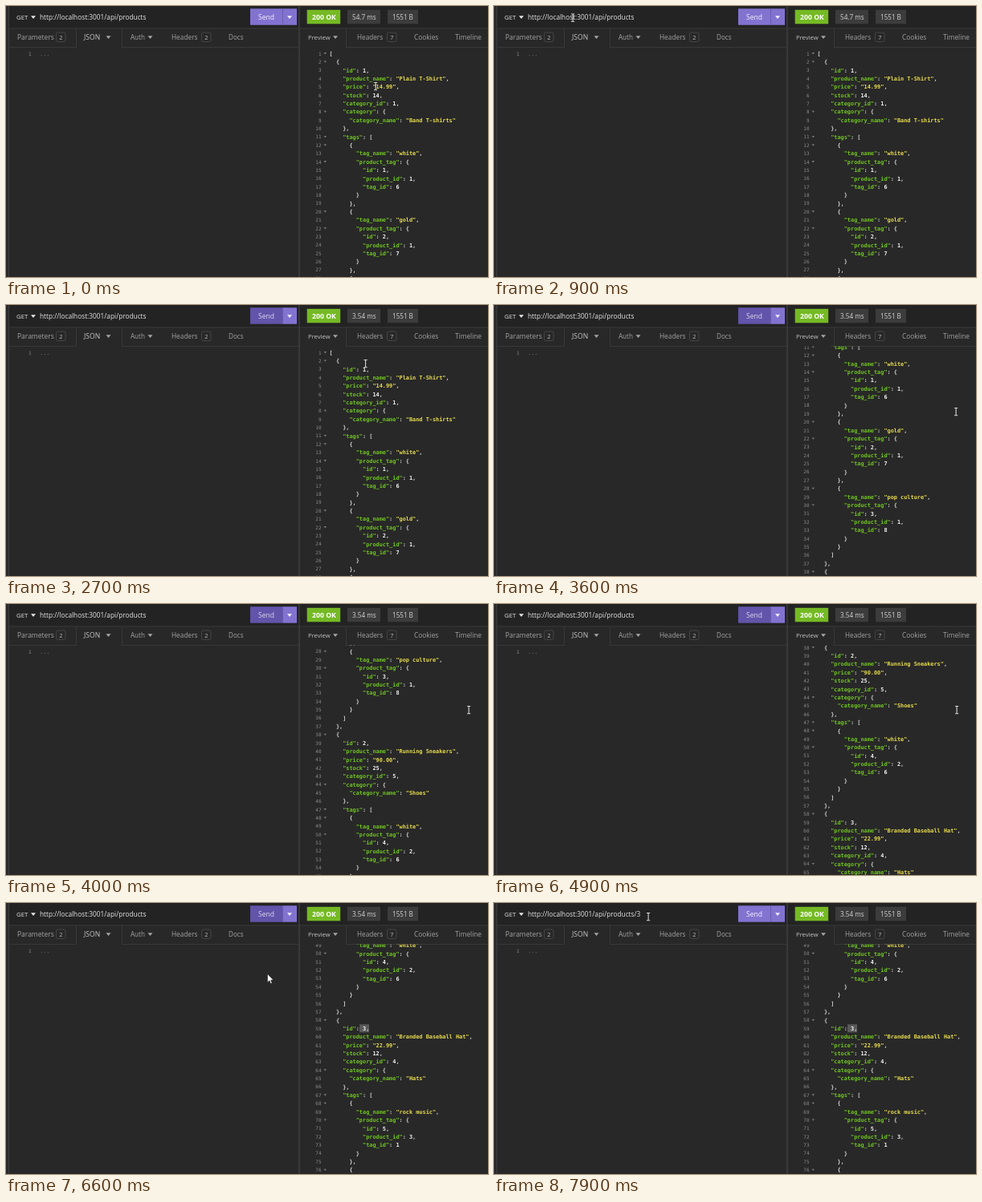
Write an HTML page with a canvas that moves like this. It is 600 by 338 pixels and loops after 8 s.

```html
<!DOCTYPE html>
<html lang="en">
<head>
<meta charset="utf-8">
<title>API client</title>
<style>
  html, body { margin: 0; width: 100%; height: 100%; overflow: hidden; background: #282828; }
  canvas { display: block; width: 600px; height: 338px; }
</style>
</head>
<body>
<canvas id="stage"></canvas>
<script>
const LOOP = 8000, STEP = 100, W = 600, H = 338;
const UI = '"Open Sans", "Noto Sans", sans-serif';
const MONO = '"DejaVu Sans Mono", monospace';
const LINE = 10.38, NOTCH = 56.1, CODE_X = 402.6, CODE_SIZE = 6.88, FIRST_Y = 59.2;
const BORDER = '#3c3c3c', MUTED = '#a3a3a3', LIGHT = '#e4e4e4';

const canvas = document.getElementById('stage');
const ctx = canvas.getContext('2d');
const ratio = window.devicePixelRatio || 1;
canvas.width = W * ratio;
canvas.height = H * ratio;

// Response body
let linkId = 0;
function product(id, product_name, price, stock, category_id, category_name, tags) {
  return {
    id, product_name, price, stock, category_id,
    category: { category_name },
    tags: tags.map(([tag_name, tag_id]) => ({
      tag_name,
      product_tag: { id: ++linkId, product_id: id, tag_id }
    }))
  };
}
const lines = JSON.stringify([
  product(1, 'Plain T-Shirt', '14.99', 14, 1, 'Band T-shirts', [['white', 6], ['gold', 7], ['pop culture', 8]]),
  product(2, 'Running Sneakers', '90.00', 25, 5, 'Shoes', [['white', 6]]),
  product(3, 'Branded Baseball Hat', '22.99', 12, 4, 'Hats', [['rock music', 1], ['pop music', 2]])
], null, 2).split('\n');

// Timeline
const pointerPath = [
  [0, 460, 100], [200, 452, 96], [700, 178, 16], [1000, 70, 14], [1200, 84, 14],
  [1500, 160, 14], [1700, 162, 14], [2000, 298, 27], [2200, 324, 16], [2500, 325, 16],
  [2900, 570, 130], [3200, 575, 133], [3600, 575, 133], [3900, 576, 132], [5200, 576, 132],
  [5500, 474, 170], [5800, 453, 157], [6000, 452, 156], [6200, 440, 156], [6400, 441, 157],
  [6800, 210, 20], [7000, 192, 17]
];
const notches = [3300, 3483, 3640, 3740, 3840, 4620, 4790, 5080, 5230];
const SELECT_URL = 1600, CLICK_SEND = 2400, BLUR = 2600;
const SELECT_ID = [6000, 6200], FOCUS_URL = 7000, TYPE = [7500, 7700];

const clamp = v => Math.max(0, Math.min(1, v));
const ease = v => v * v * (3 - 2 * v);

function pointerAt(t) {
  const next = pointerPath.findIndex(p => p[0] > t);
  if (next < 0) return pointerPath[pointerPath.length - 1].slice(1);
  const [t0, x0, y0] = pointerPath[next - 1], [t1, x1, y1] = pointerPath[next];
  const k = ease((t - t0) / (t1 - t0));
  return [x0 + (x1 - x0) * k, y0 + (y1 - y0) * k];
}

const scrollAt = t => NOTCH * notches.reduce((sum, at) => sum + ease(clamp((t - at) / 130)), 0);

// Drawing helpers
function text(str, x, y, size, color, weight = 400, family = UI) {
  ctx.font = `${weight} ${size}px ${family}`;
  ctx.fillStyle = color;
  ctx.fillText(str, x, y);
  return ctx.measureText(str).width;
}

function rect(x, y, w, h, color) {
  ctx.fillStyle = color;
  ctx.fillRect(x, y, w, h);
}

function polygon(points, color) {
  ctx.beginPath();
  points.forEach(([x, y]) => ctx.lineTo(x, y));
  ctx.closePath();
  ctx.fillStyle = color;
  ctx.fill();
}

function caret(x, y, color = MUTED, r = 3) {
  polygon([[x - r, y - r * 0.6], [x + r, y - r * 0.6], [x, y + r * 0.7]], color);
}

function badge(x, label) {
  ctx.strokeStyle = '#4c4c4c';
  ctx.lineWidth = 0.8;
  ctx.beginPath();
  ctx.roundRect(x + 0.5, 33, 11.5, 11.5, 2);
  ctx.stroke();
  text(label, x + 4.2, 41.6, 7.3, '#bcbcbc');
}

function drawRequest(t) {
  text('GET', 13, 17, 7.8, LIGHT);
  caret(34, 14, LIGHT);

  let url = 'http://localhost:3001/api/products';
  if (t >= SELECT_URL && t < CLICK_SEND) rect(140, 8.5, 35.5, 11.5, '#5a5a5a');
  TYPE.forEach((at, i) => { if (t >= at) url += '/3'[i]; });
  text(url, 42, 17, 8.3, LIGHT);

  const bright = t < BLUR || t >= FOCUS_URL;
  rect(304, 3.3, 40.5, 20.4, bright ? '#8373d0' : '#6254aa');
  rect(344.5, 3.3, 17.5, 20.4, '#8373d0');
  rect(344, 3.3, 0.8, 20.4, '#6b5cb6');
  text('Send', 314, 17.2, 8.6, bright ? '#f4f2ff' : '#dcd8f0');
  caret(353, 14, '#f0eeff');

  text('Parameters', 14, 42.2, 8.5, MUTED);
  badge(62, '2');
  text('JSON', 97, 42.2, 8.6, '#c4c4c4');
  caret(127.5, 39);
  text('Auth', 155, 42.2, 8.1, MUTED);
  caret(179.5, 39);
  text('Headers', 206, 42.2, 8.3, MUTED);
  badge(243, '2');
  text('Docs', 277, 42.2, 8.1, MUTED);

  text('1', 28, 61.5, 6, '#8a8a8a', 400, MONO);
  text('...', 42, 61.5, CODE_SIZE, '#767676', 400, MONO);
}

function drawResponseHeader(t) {
  rect(374.7, 4.8, 41.5, 17.5, '#75ba24');
  text('200 OK', 381, 17, 8.7, '#ffffff', 700);
  rect(425, 4.8, 41, 17.5, '#3c3c3c');
  text(t < CLICK_SEND ? '54.7 ms' : '3.54 ms', 431, 16.9, 8.1, '#d4d4d4');
  rect(475, 4.8, 38, 17.5, '#3c3c3c');
  text('1551 B', 481, 16.9, 8.1, '#d4d4d4');

  text('Preview', 376, 42, 7.7, '#c4c4c4');
  caret(410, 39);
  text('Headers', 437, 42.2, 8.2, MUTED);
  badge(474, '7');
  text('Cookies', 508, 42.2, 8.3, MUTED);
  text('Timeline', 559, 42.2, 8.3, MUTED);
}

function tokenColor(token, isKey) {
  if (isKey) return '#70c421';
  if (token[0] === '"') return '#e8dc4e';
  return /\d/.test(token) ? '#f2f2f2' : '#d2d2d2';
}

function drawBody(t) {
  ctx.save();
  ctx.beginPath();
  ctx.rect(366, 51.5, 234, 287);
  ctx.clip();
  const scroll = scrollAt(t);

  const selected = clamp((t - SELECT_ID[0]) / (SELECT_ID[1] - SELECT_ID[0]));
  if (selected > 0) rect(452 - 12 * selected, FIRST_Y + 58 * LINE - scroll - 5, 12 * selected, 10, '#5a5a5a');

  lines.forEach((line, i) => {
    const y = FIRST_Y + i * LINE - scroll;
    if (y < 40 || y > H + 10) return;
    ctx.textAlign = 'right';
    text(i + 1, 392.5, y + 2.4, 6, '#8a8a8a', 400, MONO);
    ctx.textAlign = 'left';
    if (/[{[]$/.test(line)) caret(397.3, y, '#777', 1.8);

    const tokens = line.match(/"[^"]*"|\d+|[^"\d]+/g);
    let x = CODE_X;
    tokens.forEach((token, n) => {
      const isKey = token[0] === '"' && (tokens[n + 1] || '')[0] === ':';
      x += text(token, x, y + 2.6, CODE_SIZE, tokenColor(token, isKey), 700, MONO);
    });
  });
  ctx.restore();
}

function drawFrame() {
  rect(0, 0, W, H, '#282828');
  rect(4, 0, 596, 27.5, '#232323');
  rect(0, 0, 3, H, '#2d2a2e');
  rect(3, 0, 1, H, BORDER);
  rect(364.5, 0, 1, H, '#4a4a4a');
  rect(4, 27.5, 596, 0.8, BORDER);
  [87, 144, 423].forEach(x => rect(x, 28, 0.8, 24, BORDER));
  [[4, 87], [144, 365], [423, 600]].forEach(([a, b]) => rect(a, 51, b - a, 0.8, BORDER));
}

function drawPointer(t) {
  const [x, y] = pointerAt(t);
  const overText = x > 365 ? y > 50 : x < 300 && y < 26;
  if (overText) {
    rect(x - 0.4, y - 4.5, 1, 9, '#e8e8e8');
    rect(x - 2, y - 5, 4.2, 0.9, '#e8e8e8');
    rect(x - 2, y + 4.3, 4.2, 0.9, '#e8e8e8');
    return;
  }
  const shape = [[0, 0], [0, 10.5], [2.4, 8.3], [4, 12], [5.7, 11.2], [4.1, 7.7], [7.2, 7.4]];
  polygon(shape.map(([dx, dy]) => [x + dx, y + dy]), '#ffffff');
  ctx.strokeStyle = '#111';
  ctx.lineWidth = 0.5;
  ctx.stroke();
}

function render() {
  const t = Math.floor(performance.now() % LOOP / STEP) * STEP;
  ctx.setTransform(ratio, 0, 0, ratio, 0, 0);
  drawFrame();
  drawRequest(t);
  drawResponseHeader(t);
  drawBody(t);
  drawPointer(t);
  requestAnimationFrame(render);
}
render();
</script>
</body>
</html>
```
